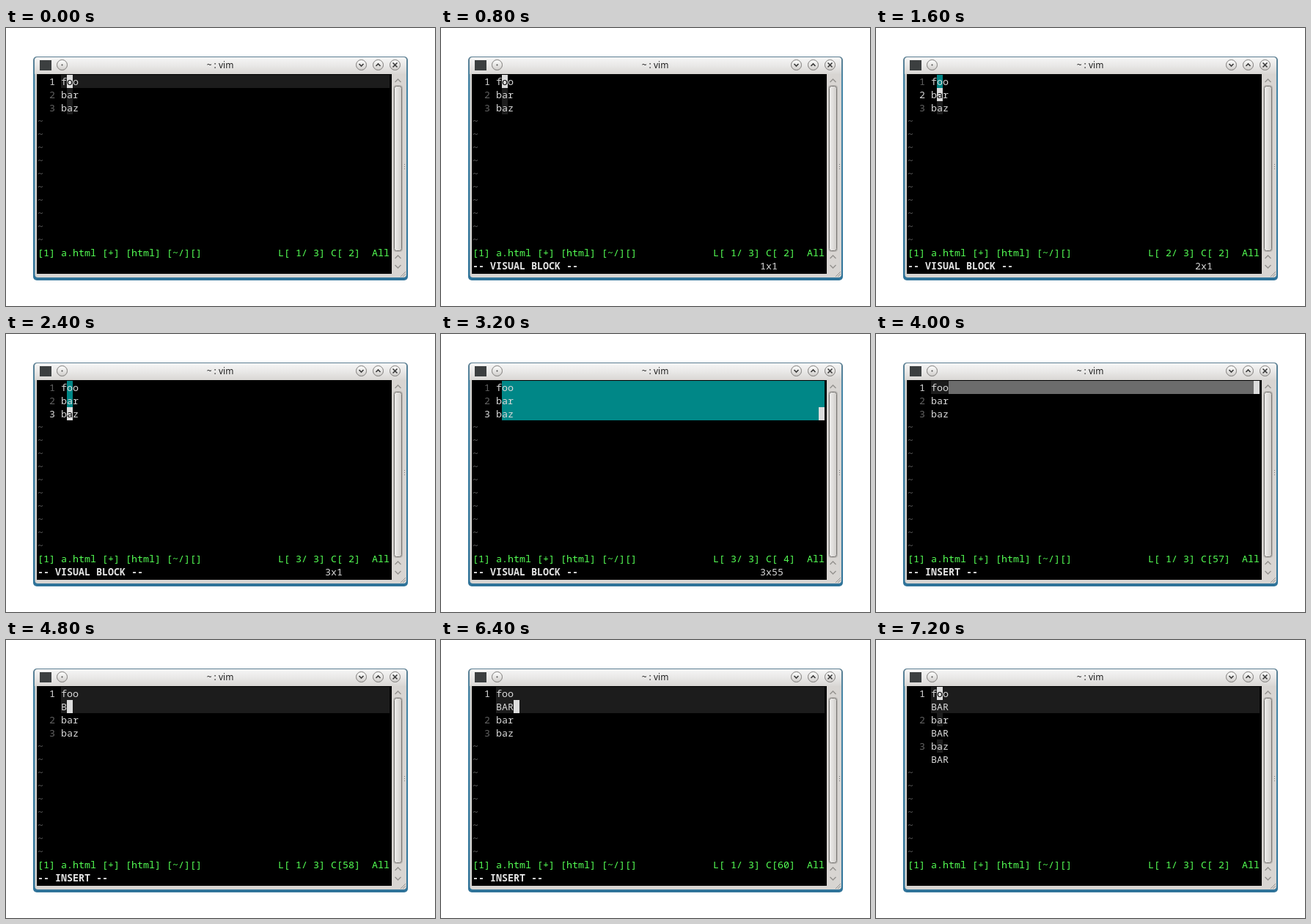
Animation of 585 by 380 pixels, one loop 8000 ms. Source, as an HTML page:

```html
<!DOCTYPE html>
<html lang="en">
<head>
<meta charset="utf-8">
<title>vim visual block append</title>
<style>
  html, body { margin: 0; width: 100%; height: 100%; overflow: hidden; background: #fff; }
  svg { display: block; width: 585px; height: 380px; }
  text { white-space: pre; }
  #screen { font: 13.333px "Noto Sans Mono", "DejaVu Sans Mono", monospace; }
  .title { font: 12px "Noto Sans", "Open Sans", sans-serif; fill: #222; }
  .line { fill: none; stroke: #3a3a3a; stroke-width: 1.6; }
  .arrow { fill: none; stroke: #92908d; stroke-width: 1.3; }
</style>
</head>
<body>
<svg viewBox="0 0 585 380" xml:space="preserve">
  <defs>
    <linearGradient id="bar" x2="0" y2="1">
      <stop offset="0" stop-color="#f6f6f6"/><stop offset=".5" stop-color="#e9e8e7"/><stop offset="1" stop-color="#d9d7d4"/>
    </linearGradient>
    <linearGradient id="frame" x2="0" y2="1">
      <stop offset="0" stop-color="#5d7f92"/><stop offset=".12" stop-color="#4384a6"/><stop offset="1" stop-color="#2f7399"/>
    </linearGradient>
    <linearGradient id="knob" x2="0" y2="1">
      <stop offset="0" stop-color="#fff"/><stop offset="1" stop-color="#cfcdca"/>
    </linearGradient>
    <linearGradient id="thumb">
      <stop offset="0" stop-color="#f0efee"/><stop offset="1" stop-color="#cfccc9"/>
    </linearGradient>
  </defs>

  <rect x="37" y="39" width="511" height="306" rx="5" fill="url(#frame)"/>
  <rect x="39.5" y="40.5" width="506.5" height="300.5" rx="4" fill="#d8d5d2"/>
  <path d="M39 63V44q0-4 4-4H542q4 0 4 4V63Z" fill="url(#bar)"/>

  <rect x="46" y="44" width="16" height="14" fill="#3c3f40"/>
  <text class="title" x="292" y="55" text-anchor="middle">~ : vim</text>
  <g fill="url(#knob)" stroke="#7d7b79">
    <circle cx="76.5" cy="50.5" r="7"/><circle cx="484.5" cy="50.5" r="7"/>
    <circle cx="507.5" cy="50.5" r="7"/><circle cx="530.5" cy="50.5" r="7"/>
  </g>
  <circle cx="76.5" cy="50.5" r="1" fill="#444"/>
  <path class="line" d="M481.5 49l3 3 3-3M504.5 52l3-3 3 3M527.5 47.5l6 6m0-6l-6 6"/>

  <rect x="42" y="63" width="484" height="273"/>

  <rect x="528" y="78" width="13" height="228" rx="4" fill="#bebbb8"/>
  <rect x="529.5" y="79.5" width="10" height="225" rx="3" fill="url(#thumb)" stroke="#777572"/>
  <path class="arrow" d="M530.5 74l4-4 4 4M530.5 315l4-4 4 4M530.5 324l4 4 4-4"/>
  <path d="M543.5 186v9" stroke="#82807e" stroke-dasharray="1 2"/>
  <path d="M538 340l7-7m-4 7l4-4" stroke="#999693"/>

  <g id="screen"></g>
</svg>
<script>
const CELL = 8, ROW = 18, LEFT = 43, TOP = 64, COLS = 60, STEP = 800;
const INK = "#d8d8d8", DIM = "#626262", GREEN = "#54ff54";
const SHADE = "#1c1c1c", TEAL = "#008787", GREY = "#6c6c6c";
const screen = document.getElementById("screen");

// Backgrounds are [row, column, columns, colour, rows].
const cursorLine = (rows = 1) => [0, 4, 56, SHADE, rows];
const plain = ["foo", "bar", "baz"];
const block = "-- VISUAL BLOCK --", insert = "-- INSERT --";
const typing = (typed, col) => ({
  lines: ["foo\n" + typed, "bar", "baz"], at: [1, 4 + typed.length], col,
  mode: insert, marks: [cursorLine(2)]
});
const below = [[1, 5, 1, SHADE], [2, 5, 1, SHADE]];

const states = [
  { at: [0, 5], marks: [cursorLine(), ...below] },
  { at: [0, 5], mode: block, size: "1x1", marks: below },
  { at: [1, 5], line: 2, mode: block, size: "2x1", marks: [[0, 5, 1, TEAL], [2, 5, 1, SHADE]] },
  { at: [2, 5], line: 3, mode: block, size: "3x1", marks: [[0, 5, 1, TEAL, 2]] },
  { at: [2, 59], line: 3, col: 4, mode: block, size: "3x55", marks: [[0, 5, 55, TEAL, 3]] },
  { at: [0, 59], col: 57, mode: insert, marks: [cursorLine(), [0, 7, 52, GREY]] },
  typing("B", 58),
  typing("BA", 59),
  typing("BAR", 60),
  { lines: plain.map(word => word + "\nBAR"), at: [0, 5],
    marks: [cursorLine(2), [2, 5, 1, SHADE], [4, 5, 1, SHADE]] }
];

function add(name, attrs, content = "") {
  const node = document.createElementNS("http://www.w3.org/2000/svg", name);
  for (const key in attrs) node.setAttribute(key, attrs[key]);
  node.textContent = content;
  screen.append(node);
}

function fill(row, col, cols, color, rows = 1) {
  add("rect", { x: LEFT + col * CELL, y: TOP + row * ROW, width: cols * CELL, height: rows * ROW, fill: color });
}

function write(row, col, content, color = INK, weight = 400) {
  add("text", { x: LEFT + col * CELL, y: TOP + row * ROW + 14, fill: color, "font-weight": weight }, content);
}

function draw({ lines = plain, at, line = 1, col = 2, mode = "", size = "", marks }) {
  screen.replaceChildren();
  marks.forEach(mark => fill(...mark));
  const rows = [];
  lines.forEach((words, i) => {
    write(rows.length, 2, String(i + 1), i + 1 === line ? INK : DIM);
    for (const word of words.split("\n")) {
      write(rows.length, 4, word);
      rows.push(word);
    }
  });
  for (let row = rows.length; row < 13; row++) write(row, 0, "~", DIM);

  const [row, column] = at;
  fill(row, column, 1, "#dcdcdc");
  write(row, column, rows[row][column - 4] || "", "#000");

  const status = `L[ ${line}/ 3] C[${String(col).padStart(2)}]  All`;
  write(13, 0, "[1] a.html [+] [html] [~/][]", GREEN);
  write(13, COLS - status.length, status, GREEN);
  write(14, 0, mode, "#e4e4e4", 700);
  write(14, 49, size);
}

let shown = -1;
function tick() {
  const index = Math.floor(performance.now() / STEP) % states.length;
  if (index !== shown) draw(states[shown = index]);
  requestAnimationFrame(tick);
}
tick();
</script>
</body>
</html>
```
